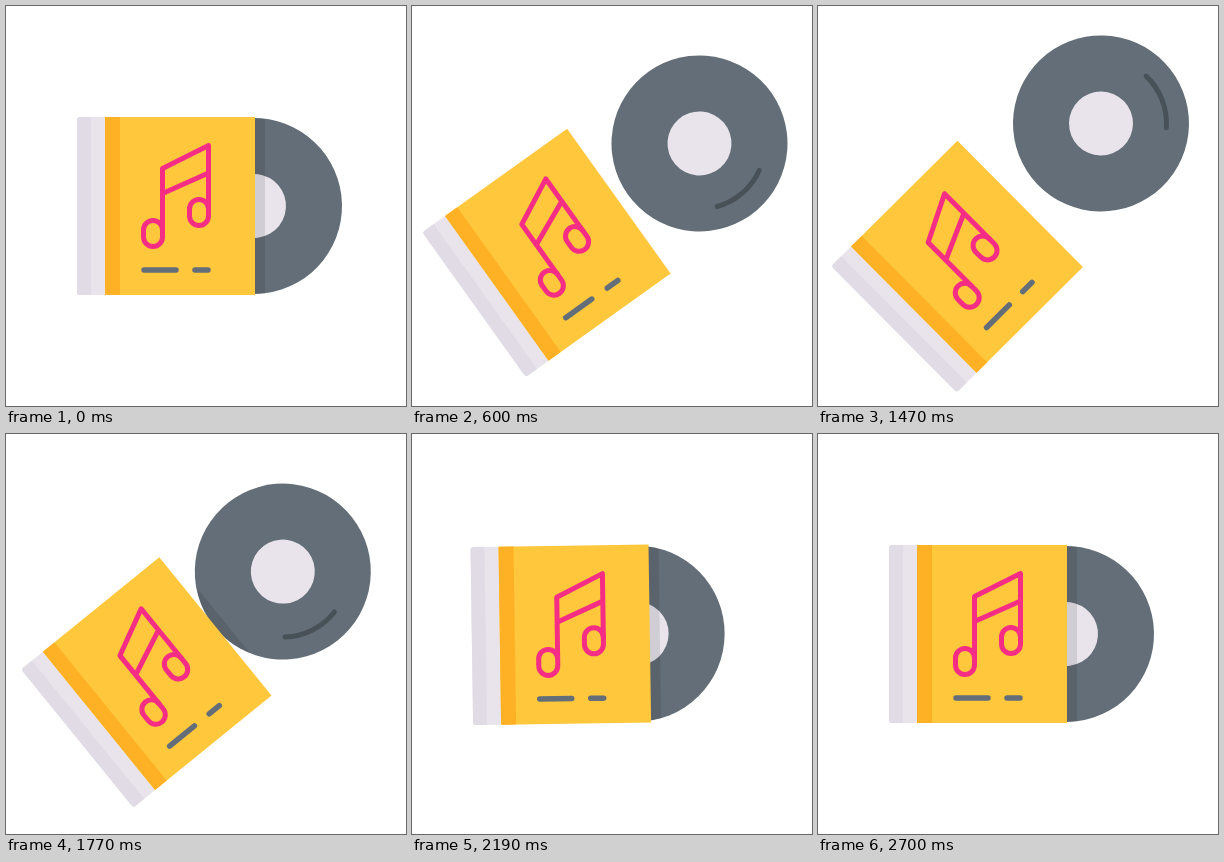
Animation, 400 px wide and 400 px high, one loop 4730 ms. Source, as an HTML page:

```html
<!DOCTYPE html>
<html lang="en">
<head>
<meta charset="utf-8">
<title>Music album</title>
<style>
  html, body { margin: 0; width: 100%; height: 100%; overflow: hidden; background: #fff; }
  svg { display: block; width: 100%; height: 100%; }
</style>
</head>
<body>
<svg viewBox="0 0 400 400">
  <defs>
    <clipPath id="discClip"><circle id="clipCircle" r="88"/></clipPath>
  </defs>
  <g id="album">
    <g id="disc">
      <circle r="88" fill="#646e78"/>
      <circle r="32" fill="#e9e4ec"/>
      <path id="shine" fill="none" stroke="#485058" stroke-width="5" stroke-linecap="round"/>
    </g>
    <g clip-path="url(#discClip)">
      <rect id="shadow" y="-90" width="99" height="180" opacity=".1"/>
    </g>
    <g id="sleeve">
      <path d="M-61-89H-86a3 3 0 0 0-3 3V86a3 3 0 0 0 3 3H-61Z" fill="#e9e4ec"/>
      <path d="M-75-89H-86a3 3 0 0 0-3 3V86a3 3 0 0 0 3 3H-75Z" fill="#e1dbe6"/>
      <rect x="-61" y="-89" width="150" height="178" fill="#ffc73b"/>
      <rect x="-61" y="-89" width="15" height="178" fill="#ffb125"/>
      <g fill="none" stroke="#f52d85" stroke-width="5" stroke-linecap="round" stroke-linejoin="round">
        <path d="M-3.5 24V-37.5L42.5-60.5V4M-3.5-12.5L42.5-33"/>
        <rect x="-22.5" y="14.5" width="19" height="26" rx="9.5"/>
        <rect x="23.5" y="-6.5" width="19" height="26" rx="9.5"/>
      </g>
      <path d="M-22 64H10M29 64H42" stroke="#646e78" stroke-width="5.5" stroke-linecap="round"/>
    </g>
  </g>
</svg>
<script>
const LOOP = 4730, STEP = 30, END = 2700;

const $ = id => document.getElementById(id);
const [album, disc, sleeve, shadow, clipCircle] =
  ["album", "disc", "sleeve", "shadow", "clipCircle"].map($);

// Cubic Bezier easing, solved for x by bisection
function bezier(x1, y1, x2, y2) {
  const curve = (a, b, s) => 3 * a * s * (1 - s) ** 2 + 3 * b * s * s * (1 - s) + s ** 3;
  return x => {
    if (x <= 0) return 0;
    if (x >= 1) return 1;
    let lo = 0, hi = 1;
    for (let i = 0; i < 30; i++) {
      const mid = (lo + hi) / 2;
      if (curve(x1, x2, mid) < x) lo = mid; else hi = mid;
    }
    return curve(y1, y2, lo);
  };
}

const easeOpen = bezier(.3, .05, .25, 1);
const easeClose = bezier(.75, 0, .7, 1);
const easeSettle = bezier(.4, 0, .4, 1);
const easeSpin = bezier(.3, .41, .64, 1);

// Open from rest to peak, close past rest to the bounce, settle back to rest
function track(rest, peak, bounce, opened, closing, closed) {
  return t => rest
    + (peak - rest) * easeOpen(t / opened)
    + (bounce - peak) * easeClose((t - closing) / (closed - closing))
    + (rest - bounce) * easeSettle((t - closed) / (END - closed));
}

const tilt = track(0, 44.9, -3.4, 1180, 1430, 2310);
const sleeveShift = track(40, 88.4, 50.2, 1080, 1130, 2280);
const discShift = track(48, 119, 21, 1080, 1300, 2280);
const spin = t => -142 + 720 * easeSpin(t / END);

function drawShine(radius, half) {
  const x = radius * Math.cos(half), y = radius * Math.sin(half);
  $("shine").setAttribute("d", `M${x} ${-y}A${radius} ${radius} 0 0 1 ${x} ${y}`);
}

function render(t) {
  const back = -sleeveShift(t), out = discShift(t);
  album.setAttribute("transform", `translate(200 200) rotate(${-tilt(t)})`);
  sleeve.setAttribute("transform", `translate(${back} 0)`);
  disc.setAttribute("transform", `translate(${out} 0) rotate(${spin(t)})`);
  clipCircle.setAttribute("cx", out);
  shadow.setAttribute("x", back);
}

const start = performance.now();
function tick() {
  const t = (performance.now() - start) % LOOP;
  render(Math.floor(t / STEP) * STEP);
  requestAnimationFrame(tick);
}

drawShine(65.5, 25 * Math.PI / 180);
render(0);
requestAnimationFrame(tick);
</script>
</body>
</html>
```
